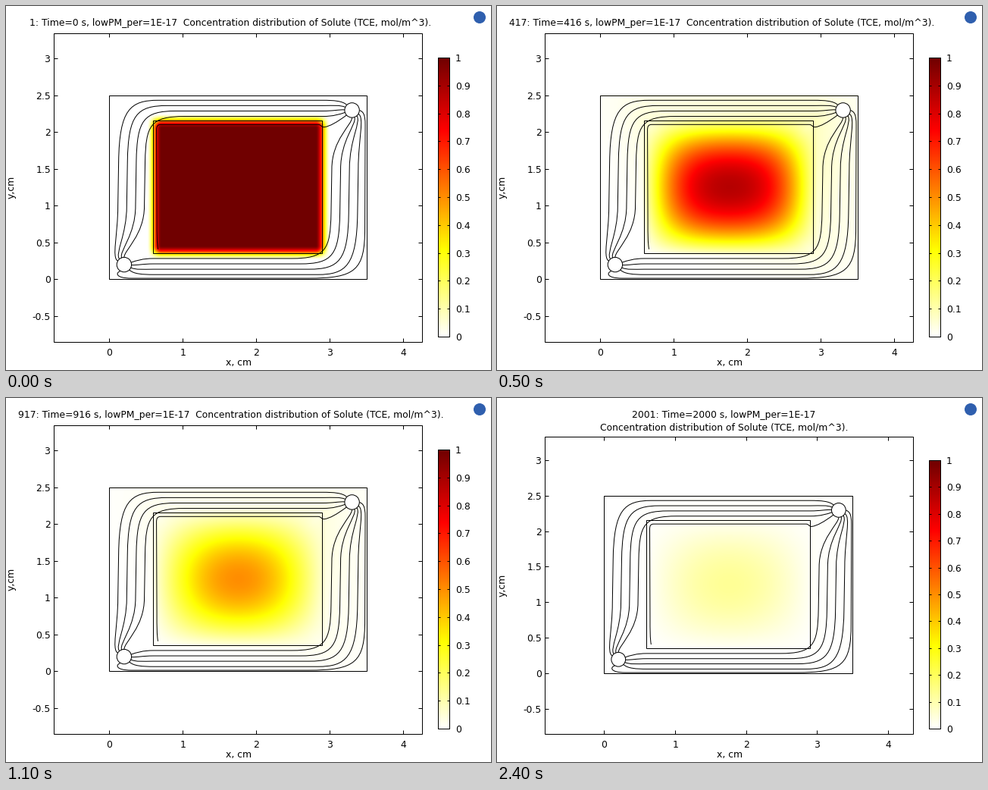
Animation of 640 by 480 pixels, one loop 2500 ms. Source, as a matplotlib script:

```python
import math

import numpy as np
import matplotlib.pyplot as plt
from matplotlib.animation import FuncAnimation
from matplotlib.colors import LinearSegmentedColormap
from matplotlib.patches import Circle, PathPatch, Rectangle
from matplotlib.path import Path

plt.rcParams["font.family"] = "DejaVu Sans"

W, H, DPI = 640, 480, 100
FRAMES, INTERVAL, T_END = 25, 100, 2000
PX = 72 / DPI
FONT = 12.4 * PX

# geometry in cm
CHAMBER = np.array([3.5, 2.5])
BLOCK = (0.6, 0.35, 2.3, 1.8)
INLET = np.array([0.2, 0.2])
OUTLET = CHAMBER - INLET
RADIUS = 0.1

DIFF = 2.8e-4
SKIN = 0.04  # the concentration reaches zero this far outside the block

# layout in pixels; half values are pixel centres
LEFT, RIGHT, BOTTOM = 63.5, 549.5, 443.5
WIDE = dict(top=36.5, scale=97, x0=136.5, y0=360.5, bar=68.5)
TALL = dict(top=51.5, scale=93.75, x0=141.5, y0=363.5, bar=82.5)

THERMAL = LinearSegmentedColormap.from_list(
    "thermal",
    [(0, "#ffffff"), (0.31, "#ffff00"), (0.74, "#ff0000"), (1, "#700000")],
    N=512)

GX, GY = np.meshgrid(np.linspace(0, CHAMBER[0], 341),
                     np.linspace(0, CHAMBER[1], 244))


def profile(u, length, t):
    """Diffusion out of a slab that starts at 1."""
    if t == 0:
        s = np.clip((np.minimum(u, length - u) + 0.1) / 0.2, 0, 1)
        return s * s * (3 - 2 * s)
    u, length = u + SKIN, length + 2 * SKIN
    total = np.zeros_like(u)
    for n in range(1, 40, 2):
        k = n * math.pi / length
        total += 4 / (n * math.pi) * np.sin(k * u) * math.exp(-DIFF * k * k * t)
    return np.where((u > 0) & (u < length), np.clip(total, 0, 1), 0)


def concentration(t):
    bx, by, bw, bh = BLOCK
    core = profile(GX - bx, bw, t) * profile(GY - by, bh, t)
    if t == 0:
        return core
    # solute carried downstream along the block walls
    dx = np.abs(GX - bx - bw / 2) - bw / 2
    dy = np.abs(GY - by - bh / 2) - bh / 2
    outside = np.hypot(np.maximum(dx, 0), np.maximum(dy, 0))
    depth = np.maximum(-np.maximum(dx, dy), 0)
    flow = np.clip((GX / CHAMBER[0] + GY / CHAMBER[1] - 0.4) / 1.1, 0, 1)
    plume = 0.15 * math.exp(-0.0014 * t) * flow
    return core + plume * np.exp(-outside / 0.45 - depth / 0.15) * (1 - core)


def chain(start, *segments):
    """Path of straight (one point) and cubic (three points) segments."""
    verts, codes = [start], [Path.MOVETO]
    for seg in segments:
        verts += seg
        codes += [Path.LINETO] if len(seg) == 1 else [Path.CURVE4] * 3
    return Path(np.array(verts, float), codes)


def around(centre, degrees, r=RADIUS):
    a = math.radians(degrees)
    return centre + r * np.array([math.cos(a), math.sin(a)])


def stream(k):
    """Line k, counted from the outer wall, over the top of the block."""
    x, y = 0.115 + 0.12 * k, 2.435 - 0.073 * k
    out, land = 150 - 20 * k, 135 + 21 * k
    return chain(
        around(INLET, out),
        [around(INLET, out, 0.2), (x, 0.6), (x, 1)],
        [(x + 0.01, 1.6)],
        [(x + 0.02, y - 0.12), (x + 0.17 - 0.03 * k, y), (x + 0.55, y)],
        [(2.9, y)],
        [(3.05, y), around(OUTLET, land, 0.18), around(OUTLET, land)])


def streams():
    upper = [stream(k) for k in range(4)]
    lower = [Path(CHAMBER - p.vertices, p.codes) for p in upper]
    wall = chain(
        around(INLET, 240),
        [(0.08, 0.09), (0.08, 0.015), (0.3, 0.015)],
        [(2.7, 0.015)],
        [(3.35, 0.015), (3.475, 0.12), (3.475, 0.7)],
        [(3.48, 2.1)],
        [(3.48, 2.25), (3.45, 2.28), around(OUTLET, 0)])
    inner = chain(
        (0.66, 0.41),
        [(0.645, 0.5), (0.645, 0.6), (0.645, 0.8)],
        [(0.64, 2.03)],
        [(0.64, 2.08), (0.65, 2.105), (0.7, 2.105)],
        [(2.84, 2.105)],
        [(2.88, 2.105), (2.88, 2.07), (2.92, 2.07)],
        [(3.0, 2.08), (3.1, 2.14), around(OUTLET, 222)])
    return upper + lower + [wall, inner]


STREAMS = streams()

fig = plt.figure(figsize=(W / DPI, H / DPI), dpi=DPI, facecolor="white")
ax = fig.add_axes([0, 0, 1, 1])


def line(xs, ys):
    ax.plot(xs, ys, color="black", lw=PX, snap=False, zorder=3,
            solid_capstyle="butt")


def outline(shape, z=3, fill="none"):
    shape.set(fc=fill, ec="black", lw=PX, snap=False, zorder=z)
    ax.add_patch(shape)


def box(x0, y0, x1, y1):
    outline(Rectangle((x0, y0), x1 - x0, y1 - y0))


def label(x, y, text, ha="center", va="baseline", **kw):
    ax.text(x, y, text, ha=ha, va=va, fontsize=FONT, color="black", **kw)


def pixel(v):
    return math.floor(v) + 0.5


def draw_axes(lay):
    top, k, x0, y0 = lay["top"], lay["scale"], lay["x0"], lay["y0"]
    box(LEFT, top, RIGHT, BOTTOM)
    for v in range(5):
        x = pixel(x0 + k * v)
        line([x, x], [top, top + 5])
        line([x, x], [BOTTOM, BOTTOM - 5])
        label(x, 461, f"{v}")
    for v in np.arange(-0.5, 3.1, 0.5):
        y = pixel(y0 - k * v)
        line([LEFT, LEFT + 5], [y, y])
        line([RIGHT, RIGHT - 5], [y, y])
        label(59, y + 4.5, f"{v:g}", ha="right")
    label(307, 474, "x, cm")
    label(7, (top + BOTTOM) / 2 - 1, "y,cm", va="center", rotation=90)


def draw_bar(top):
    low, x0, x1 = 436.5, 570.5, 585.5
    ax.imshow(np.linspace(1, 0, 512)[:, None], cmap=THERMAL, vmin=0, vmax=1,
              extent=(x0, x1, low, top), aspect="auto", zorder=1)
    box(x0, top, x1, low)
    for n in range(11):
        y = pixel(low + (top - low) * n / 10)
        line([x0, x0 + 3], [y, y])
        line([x1 - 3, x1], [y, y])
        label(593, y + 4.5, f"{n / 10:g}", ha="left")


def draw_chamber(lay, t):
    k, x0, y0 = lay["scale"], lay["x0"], lay["y0"]

    def place(x, y):
        return x0 + k * x, y0 - k * y

    def frame(x, y, w, h):
        corners = place(x, y) + place(x + w, y + h)
        box(*map(pixel, corners))

    right, top = place(*CHAMBER)
    ax.imshow(concentration(t), cmap=THERMAL, vmin=0, vmax=1, origin="lower",
              extent=(x0, right, y0, top), aspect="auto",
              interpolation="bilinear", zorder=1)
    for path in STREAMS:
        outline(PathPatch(Path(path.vertices * (k, -k) + (x0, y0), path.codes)))
    frame(0, 0, *CHAMBER)
    frame(*BLOCK)
    for well in (INLET, OUTLET):
        outline(Circle(place(*well), RADIUS * k), z=4, fill="white")


def draw_title(t, wrapped):
    head = f"{t + 1}: Time={t} s, lowPM_per=1E-17"
    tail = "Concentration distribution of Solute (TCE, mol/m^3)."
    if wrapped:
        label(299.5, 26, head)
        label(300, 42, tail)
    else:
        label(296.5, 26, f"{head}  {tail}")


def draw(i):
    ax.clear()
    ax.axis("off")
    t = T_END * i / (FRAMES - 1)
    wrapped = t >= 1000
    lay = TALL if wrapped else WIDE
    draw_chamber(lay, t)
    draw_axes(lay)
    draw_bar(lay["bar"])
    draw_title(int(t), wrapped)
    ax.add_patch(Circle((625, 15), 8, fc="#2f5fae", ec="none"))
    ax.set_xlim(0, W)
    ax.set_ylim(H, 0)
    return []


anim = FuncAnimation(fig, draw, frames=FRAMES, interval=INTERVAL,
                     init_func=lambda: [], repeat=True, repeat_delay=0)
plt.show()
```
